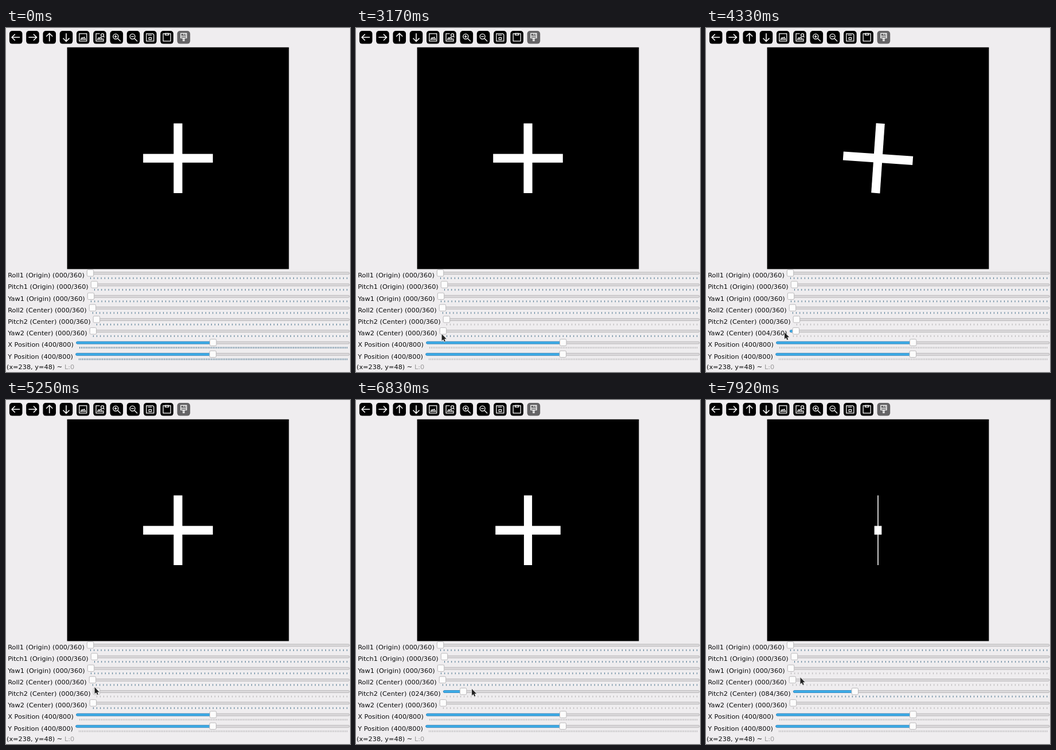
An HTML page with a canvas that plays this animation: 600x600 px, repeating every 8 s.

```html
<!DOCTYPE html>
<html>
<head>
<meta charset="utf-8">
<style>
html, body { margin: 0; width: 100%; height: 100%; overflow: hidden; background: #efedef; }
canvas { display: block; }
</style>
</head>
<body>
<canvas id="stage" width="600" height="600"></canvas>
<script>
const ctx = document.getElementById('stage').getContext('2d');
const LOOP = 8000;
const LABELS = ['Roll1 (Origin)', 'Pitch1 (Origin)', 'Yaw1 (Origin)', 'Roll2 (Center)',
  'Pitch2 (Center)', 'Yaw2 (Center)', 'X Position', 'Y Position'];
const PITCH2 = 4, YAW2 = 5;

const LEFT_ARROW = 'M7 0H-7M-1.5-5.5L-7 0L-1.5 5.5';
const SQUARE = 'M-6.5-6.5H6.5V6.5H-6.5Z';
const HILLS = 'M-4 3.5L-1.5 .5L0 2L2-.5L4.5 3.5Z';
const LENS = 'M3-1.5A4.5 4.5 0 1 1-6-1.5A4.5 4.5 0 1 1 3-1.5M2 2L7 7M-4-1.5H1';
const ICONS = [
  LEFT_ARROW, LEFT_ARROW, LEFT_ARROW, LEFT_ARROW,
  SQUARE + HILLS,
  'M0-6.5H-6.5V6.5H6.5V2' + HILLS + 'M7-4A2.5 2.5 0 1 1 2-4A2.5 2.5 0 1 1 7-4M6-2L8 0',
  LENS + 'M-1.5-4V1',
  LENS,
  'M-6.5-6.5H4.5L6.5-4.5V6.5H-6.5ZM-4-4H3M-2 0H2V4H-2Z',
  SQUARE + 'M-3-7H3V-4H-3Z',
  'M-5-7H5V1H-5ZM-5-2H5M-1 1V6H1V1M0-6V-4M3-6V-4'
].map(d => new Path2D(d));
const ARROW_TURNS = [0, 2, 1, 3]; // quarter turns: left, right, up, down
const POINTER = new Path2D('M0 0V11.5L2.6 9L4.4 13L6.2 12.2L4.5 8.3H8Z');

const clamp = x => Math.min(1, Math.max(0, x));
const ramp = (t, from, to) => clamp((t - from) / (to - from));
const mix = (a, b, p) => a + (b - a) * p;

const pitchAt = t => 14 * ramp(t, 5920, 6670) + 10 * ramp(t, 6670, 6830) + 60 * ramp(t, 6830, 7580);
const yawAt = t => 40 * (ramp(t, 3580, 3950) - ramp(t, 3950, 4373));

// Stops the pointer glides between: [time, x, y]
const STOPS = [
  [80, 590, 120], [880, 524, 261], [1000, 68, 525], [1830, 190.5, 569], [3080, 316, 536],
  [3170, 148, 534], [3250, 280, 534], [3420, 148, 532], [3950, 205, 533], [4330, 137, 531],
  [5170, 154.5, 501], [6000, 156, 502], [6830, 202, 504], [7580, 262, 505], [7920, 164.5, 484]
];

function pointerAt(t) {
  const i = Math.max(1, STOPS.findIndex(stop => stop[0] > t));
  if (t >= STOPS.at(-1)[0]) return STOPS.at(-1).slice(1);
  const [t0, x0, y0] = STOPS[i - 1], [t1, x1, y1] = STOPS[i];
  const p = ramp(t, t0, t1);
  return [mix(x0, x1, p), mix(y0, y1, p)];
}

// Ticks fade to grey on the rows the pointer has recently worked on
function isDimmed(row, t) {
  if (row > YAW2) return t >= 2330;
  if (row === YAW2) return t >= 5670 || (t >= 3580 && t < 4420);
  if (row === PITCH2) return t >= 2330 && t < 7670;
  return row > 1 && t >= 7670;
}

function box(x, y, w, h, r, fill, stroke) {
  ctx.beginPath();
  ctx.roundRect(x, y, w, h, r);
  ctx.fillStyle = fill;
  ctx.fill();
  if (!stroke) return;
  ctx.strokeStyle = stroke;
  ctx.lineWidth = 1;
  ctx.stroke();
}

function text(s, x, y, color = '#0c0d0e') {
  ctx.font = '11.3px "DejaVu Sans", sans-serif';
  ctx.fillStyle = color;
  ctx.fillText(s, x, y);
  return x + ctx.measureText(s).width;
}

function drawToolbar() {
  ICONS.forEach((icon, i) => {
    ctx.save();
    ctx.translate(17.2 + i * 29.27, 16.3);
    box(-11.3, -11.3, 22.6, 22.6, 5, i < 10 ? '#000' : '#656466');
    ctx.rotate((ARROW_TURNS[i] || 0) * Math.PI / 2);
    ctx.strokeStyle = '#fff';
    ctx.lineWidth = i < 4 ? 1.6 : 1.3;
    ctx.stroke(icon);
    ctx.restore();
  });
}

function drawSlider(row, value, t) {
  const max = row > YAW2 ? 800 : 360;
  const y = 427.9 + row * 20.2;
  const digits = String(Math.round(value)).padStart(3, '0');
  const left = text(`${LABELS[row]} (${digits}/${max})`, 3.2, y + 7.2) + 4.2;
  const start = left + 6, span = 594.3 - start;
  const knob = start + span * value / max;

  box(left + .5, y - 2, 598.5 - left, 3.8, 1.9, '#dcdadc', '#b9b7b9');
  if (value > 0) box(left + .5, y - 2, knob - left, 3.8, 1.9, '#3daee9', '#3189c4');

  ctx.fillStyle = isDimmed(row, t) ? '#b0afb1' : '#436f8a';
  for (let v = 0; v <= max; v += 5) ctx.fillRect(start + span * v / max, y + 7, 1, 3);
  box(knob - 5.7, y - 6.3, 11.5, 11.5, 2, '#fcfcfc', '#bab8ba');
}

function drawView(yaw, pitch) {
  ctx.fillStyle = '#000';
  ctx.fillRect(106.6, 33.7, 386.8, 386.8);
  ctx.save();
  ctx.translate(300, 227.2);
  ctx.scale(Math.cos(pitch * Math.PI / 180), 1);
  ctx.rotate(yaw * Math.PI / 180);
  ctx.fillStyle = '#fff';
  ctx.fillRect(-60.8, -7.6, 121.6, 15.2);
  ctx.fillRect(-7.6, -60.8, 15.2, 121.6);
  ctx.restore();
}

function drawPointer(t) {
  if (t < 80) return;
  ctx.save();
  ctx.translate(...pointerAt(t));
  ctx.strokeStyle = '#e8e8e8';
  ctx.lineWidth = 1.4;
  ctx.stroke(POINTER);
  ctx.fillStyle = '#222';
  ctx.fill(POINTER);
  ctx.restore();
}

function draw(t) {
  const yaw = yawAt(t);
  const values = [0, 0, 0, 0, pitchAt(t), yaw, 400, 400];
  ctx.fillStyle = '#efedef';
  ctx.fillRect(0, 0, 600, 600);
  drawToolbar();
  values.forEach((value, row) => drawSlider(row, value, t));
  drawView(yaw, pitchAt(t - 50)); // the view trails the slider slightly
  text('L:0', text('(x=238, y=48) ~ ', 1, 595.3), 595.3, '#999');
  drawPointer(t);
}

function frame() {
  draw(performance.now() % LOOP);
  requestAnimationFrame(frame);
}
frame();
</script>
</body>
</html>
```
